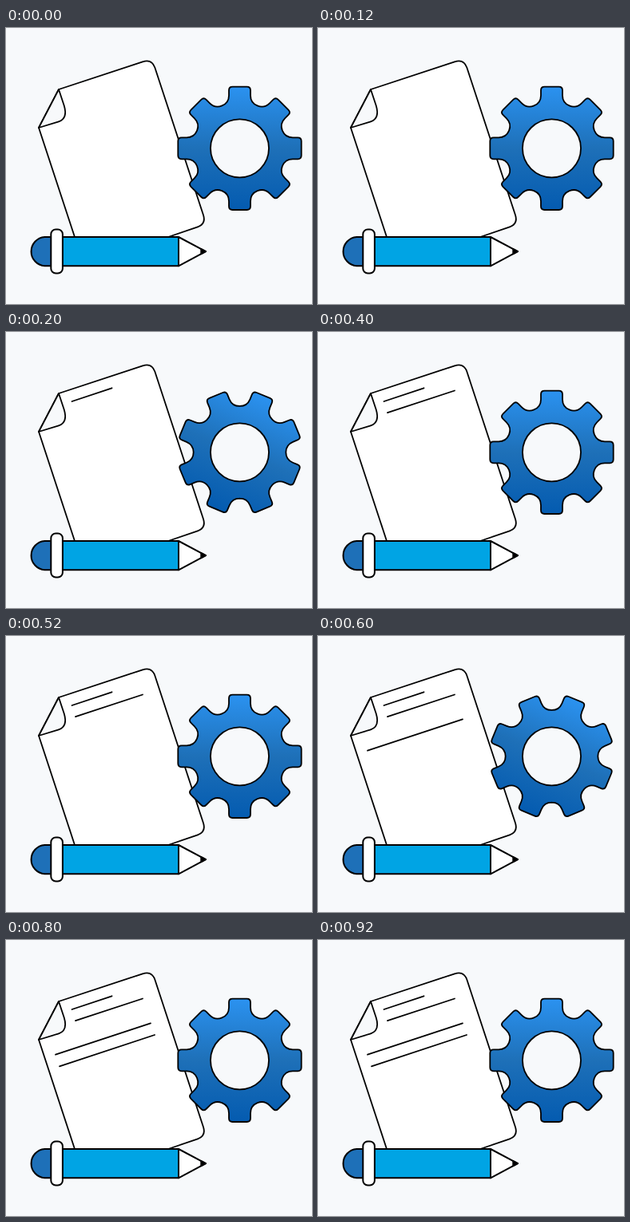
Recreate the animation shown at these times as an HTML page. Size 383x346 px, loop 1 s.

```html
<!DOCTYPE html>
<html lang="en">
<head>
<meta charset="utf-8">
<title>Document setup</title>
<style>
  html, body { margin: 0; width: 100%; height: 100%; overflow: hidden; background: #f7f9fb; }
  svg { display: block; width: 100%; height: 100%; }
</style>
</head>
<body>
<svg viewBox="0 0 383 346" fill="#fff" stroke="#000" stroke-width="1.8" stroke-linejoin="round" stroke-linecap="round">
  <defs>
    <linearGradient id="blue" gradientUnits="userSpaceOnUse" x1="0" y1="-77" x2="0" y2="77">
      <stop offset="0" stop-color="#2b92f0"/>
      <stop offset=".5" stop-color="#1e70b8"/>
      <stop offset="1" stop-color="#045bb0"/>
    </linearGradient>
  </defs>

  <!-- paper -->
  <path d="M86 262L41 125L66 77L171 42.3Q182.5 38.5 186.3 49.5L247 234.5Q250.5 245.5 240 249.3L203 262"/>
  <path fill="#f7f9fb" d="M66 77L72.8 97.5Q77.5 113.5 66 117.3L41 125Z"/>
  <g id="lines">
    <path d="M82.5 87L132.5 70.3"/>
    <path d="M87 101.2L171 73.5"/>
    <path d="M62 143.7L181 104.3"/>
    <path d="M67 158.3L186 119"/>
  </g>

  <!-- pencil -->
  <g stroke-width="2">
    <path d="M57 262H48.4A18.2 18.2 0 0 0 48.4 298.3H57Z" fill="#1e70b8"/>
    <path d="M216 262L250 280.2L216 298.3Z"/>
    <path d="M244.3 277.2L250 280.2L244.3 283.2Z" fill="#000"/>
    <rect x="70" y="262" width="146" height="36.3" fill="#00a4e4"/>
    <rect x="56.3" y="252.5" width="14.6" height="55" rx="6"/>
  </g>

  <g transform="translate(292.5 150.8)">
    <path id="gear" fill="url(#blue)"/>
    <circle r="36.5" fill="#f7f9fb"/>
  </g>
</svg>
<script>
  const gear = document.getElementById('gear');
  const lines = [...document.getElementById('lines').children];
  const STEP = 200, STEPS = 5, TEETH = 8;

  // Polygon whose corners are rounded by the distance r along each edge.
  function roundedPath(corners) {
    const toward = (a, b) => {
      const k = a.r / Math.hypot(b.x - a.x, b.y - a.y);
      return `${a.x + (b.x - a.x) * k} ${a.y + (b.y - a.y) * k}`;
    };
    const n = corners.length;
    return corners.map((c, i) => {
      const before = corners[(i + n - 1) % n], after = corners[(i + 1) % n];
      return `${i ? 'L' : 'M'}${toward(c, before)}Q${c.x} ${c.y} ${toward(c, after)}`;
    }).join('') + 'Z';
  }

  function gearCorners(half, root, tip) {
    const corners = [];
    for (let i = 0; i < TEETH; i++) {
      const angle = i * 2 * Math.PI / TEETH, c = Math.cos(angle), s = Math.sin(angle);
      const add = (x, y, r) => corners.push({ x: x * c + y * s, y: x * s - y * c, r });
      add(-half, root, 9.4);
      add(-half, tip, 4.5);
      add(half, tip, 4.5);
      add(half, root, 9.4);
    }
    return corners;
  }

  function draw(time) {
    const step = Math.floor(time / STEP) % STEPS;
    gear.setAttribute('transform', `rotate(${step % 2 * 180 / TEETH})`);
    lines.forEach((line, i) => line.setAttribute('visibility', i < step ? 'visible' : 'hidden'));
  }

  gear.setAttribute('d', roundedPath(gearCorners(13.5, 57, 77.2)));

  const start = performance.now();
  function tick() {
    draw(performance.now() - start);
    requestAnimationFrame(tick);
  }
  tick();
</script>
</body>
</html>
```
